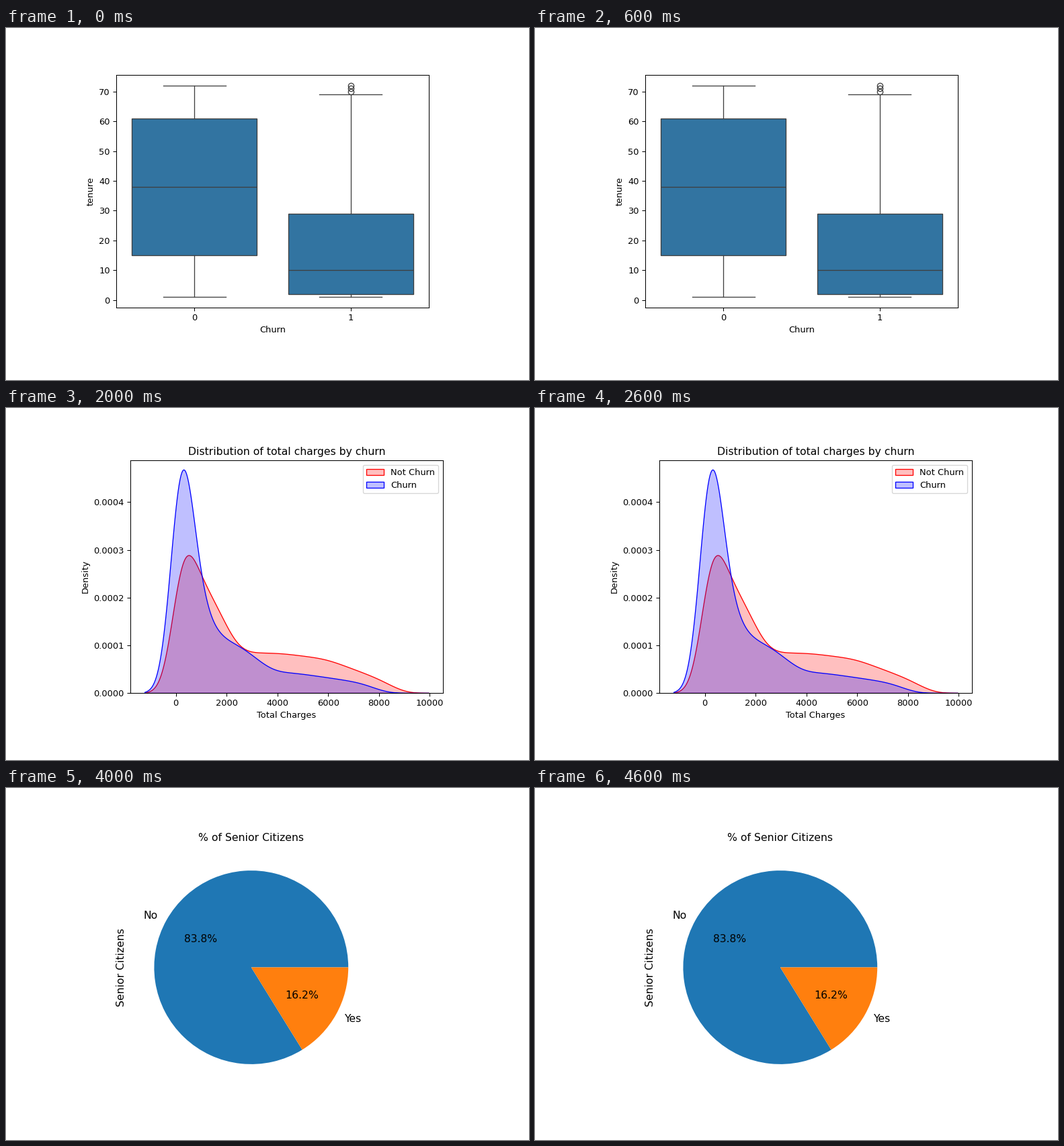
These frames come from a looping animation (778x525 px, 5000 ms). A matplotlib script:

```python
import matplotlib.pyplot as plt
import numpy as np
from matplotlib.animation import FuncAnimation
from matplotlib.ticker import PercentFormatter

W, H, DPI = 778, 525, 100
S = 0.939  # scale of all text and line sizes

plt.rcParams.update({
    "font.family": "DejaVu Sans",
    "font.size": 10 * S,
    "axes.linewidth": 0.8 * S,
    "axes.titlepad": 6 * S,
    "axes.labelpad": 4 * S,
    "patch.linewidth": S,
    "lines.markersize": 6 * S,
})
for tick in ("xtick", "ytick"):
    plt.rcParams.update({
        f"{tick}.major.size": 3.5 * S,
        f"{tick}.major.pad": 3.5 * S,
        f"{tick}.major.width": 0.8 * S,
    })

fig = plt.figure(figsize=(W / DPI, H / DPI), dpi=DPI, facecolor="white")


def panel(left, top, right, bottom):
    """Axes placed by pixel edges, measured from the top left."""
    return fig.add_axes([left / W, 1 - bottom / H,
                         (right - left) / W, (bottom - top) / H])


def kde(x, knots, pile=0, bw=420):
    """Piecewise-linear density plus a pile near zero, Gaussian-smoothed."""
    step = 10
    t = np.arange(step / 2, 9500, step)
    raw = np.interp(t, *zip(*knots)) + pile * np.exp(-t / 350)
    kernel = np.exp(-((x[:, None] - t) / bw) ** 2 / 2)
    return kernel @ raw * step / (bw * np.sqrt(2 * np.pi))


def tenure_boxes():
    ax = panel(164, 70, 629, 417)
    line = dict(color="#3f3f3f", linewidth=S)
    stats = [
        dict(label="0", whislo=1, q1=15, med=38, q3=61, whishi=72, fliers=[]),
        dict(label="1", whislo=1, q1=2, med=10, q3=29, whishi=69,
             fliers=[70, 71, 72]),
    ]
    ax.bxp(stats, positions=[0, 1], widths=0.8, capwidths=0.4,
           patch_artist=True,
           boxprops=dict(facecolor="#3274a1", edgecolor="#3f3f3f", linewidth=S),
           whiskerprops=line, capprops=line, medianprops=line,
           flierprops=dict(marker="o", markerfacecolor="none",
                           markeredgecolor="#3f3f3f", markeredgewidth=S))
    ax.set(xlim=(-0.5, 1.5), ylim=(-2.55, 75.55),
           xlabel="Churn", ylabel="tenure")
    return ax


def dependents_bars():
    ax = panel(101.6, 35, 683, 469)
    big = 14 * S
    no = np.array([90.2, 48.9])
    base = np.zeros(2)
    for name, part, color in (("No", no, "#2e86c1"), ("Yes", 100 - no, "#85c1e9")):
        ax.bar([0, 1], part, 0.2, bottom=base, color=color, label=name)
        for x, y, v in zip((0, 1), base, part):
            ax.text(x - 0.05, y + 0.4 * v, f"{v:.0f}%", color="white",
                    weight="bold", size=big)
        base = base + part
    ax.set(xlim=(-0.35, 1.35), ylim=(0, 105))
    ax.set_xticks([0, 1], ["No", "Yes"])
    ax.yaxis.set_major_formatter(PercentFormatter())
    ax.set_xlabel("Partner", size=big)
    ax.set_ylabel("% Customers", size=big)
    ax.set_title("% Customers with/without dependents based on "
                 "whether they have a partner", size=big)
    ax.legend(loc="center", prop={"size": big}, title="Dependents",
              title_fontsize=10 * S)
    return ax


def charges_density():
    ax = panel(185, 78, 650, 425)
    x = np.linspace(-1227, 9957, 300)
    stay = kde(x, [(0, 580), (400, 326), (1000, 236), (1700, 180), (2400, 85),
                   (4100, 84), (5900, 72), (8000, 30), (9000, 0)])
    leave = kde(x, [(0, 100), (1500, 112), (2600, 98), (3800, 44), (4600, 43),
                    (6000, 32.5), (7300, 22), (8300, 0)], pile=1424)
    for name, y, color in (("Not Churn", stay, "red"), ("Churn", leave, "blue")):
        ax.fill_between(x, y * 1e-6, facecolor=(color, 0.25), edgecolor=color,
                        linewidth=S, label=name)
    ax.set(xlim=(-1786, 10516), ylim=(0, 487.8e-6), xlabel="Total Charges",
           ylabel="Density", title="Distribution of total charges by churn")
    ax.legend(loc="upper right")
    return ax


def tenure_histogram():
    ax = panel(176.5, 78.4, 641.2, 425.2)
    bins = 36
    k = np.arange(bins)
    j = k[::-1]
    # bathtub: a slope and a spike at each end, with a light ripple
    counts = (120 + 177 * np.exp(-k / 6) + 551 * np.exp(-1.58 * k)
              + 105 * np.exp(-j / 3.5) + 312 * np.exp(-3 * j)
              + 7 * np.cos(2 * np.pi * (k - 8) / 2.85))
    width = 71 / bins
    ax.bar(1 + k * width, counts, width, align="edge", color="#5dade2",
           edgecolor="black", alpha=0.5, snap=False)
    ax.set(xlim=(-2.55, 75.55), ylim=(0, 893.6), xlabel="Tenure (months)",
           ylabel="Customers count", title="Customers tenure")
    return ax


def senior_pie():
    ax = panel(184.3, 87, 545.3, 448)
    size = 12 * S
    ax.pie([83.8, 16.2], labels=["No", "Yes"], autopct="%.1f%%",
           colors=["#1f77b4", "#ff7f0e"], textprops={"size": size})
    ax.set_ylabel("Senior Citizens", size=size)
    ax.set_title("% of Senior Citizens", size=size)
    return ax


slides = [tenure_boxes(), dependents_bars(), charges_density(),
          tenure_histogram(), senior_pie()]


def show(i):
    for k, ax in enumerate(slides):
        ax.set_visible(k == i)
    return slides


show(0)
anim = FuncAnimation(fig, show, frames=len(slides), interval=1000,
                     repeat=True, repeat_delay=0, blit=False)
plt.show()
```
